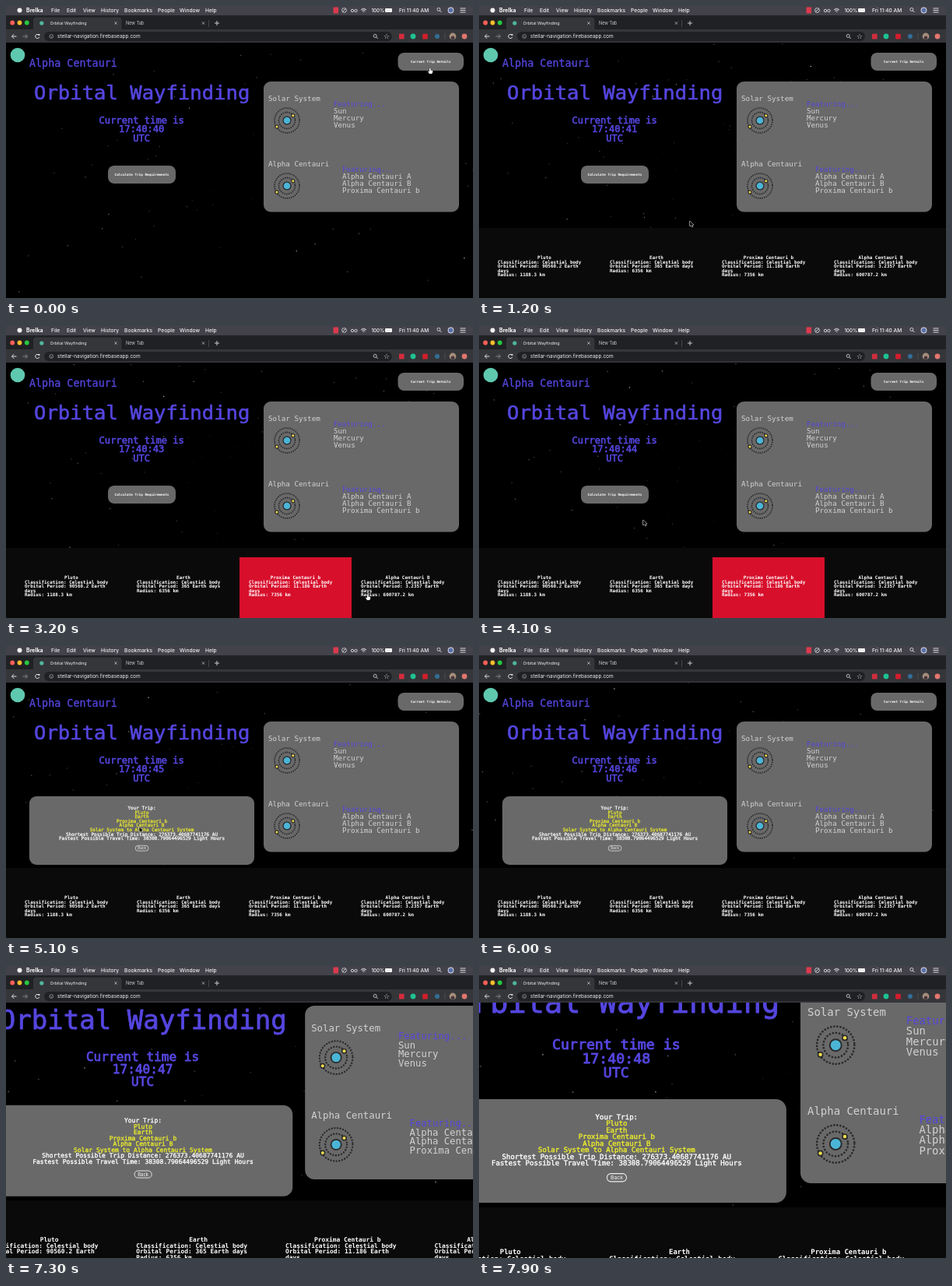
Recreate the animation shown at these times as an HTML page with a canvas. Size 600 by 375 pixels, loop 8 s.

```html
<!DOCTYPE html>
<html lang="en">
<head>
<meta charset="utf-8">
<title>Orbital Wayfinding</title>
<style>
html, body { margin: 0; width: 100%; height: 100%; overflow: hidden; background: #000; }
canvas { display: block; width: 600px; height: 375px; }
</style>
</head>
<body>
<canvas id="stage" width="600" height="375"></canvas>
<script>
const c = document.getElementById('stage').getContext('2d');
const LOOP = 8000, TAU = Math.PI * 2;
const MONO = '"DejaVu Sans Mono", monospace', SANS = 'Inter, sans-serif';
const VIOLET = '#5546df', GREY = '#696969', PALE = '#d2d2d2', YELLOW = '#eeee2c';
const BAR_AT = 700, PICK_AT = 2300, TRIP_AT = 4500, HIDE_AT = 5400, ZOOM_AT = 6600;

function text(s, x, y, size, color, { align = 'left', weight = 400, font = MONO, thick = 0 } = {}) {
  c.font = `${weight} ${size}px ${font}`;
  c.textAlign = align;
  c.fillStyle = c.strokeStyle = color;
  c.fillText(s, x, y);
  if (thick) {
    c.lineWidth = thick;
    c.lineJoin = 'round';
    c.strokeText(s, x, y);
  }
}

function box(x, y, w, h, r, color) {
  c.fillStyle = color;
  c.beginPath();
  c.roundRect(x, y, w, h, r);
  c.fill();
}

function disc(x, y, r, color) {
  c.fillStyle = color;
  c.beginPath();
  c.arc(x, y, r, 0, TAU);
  c.fill();
}

function ring(x, y, r, color, width = 0.8, from = 0, to = TAU) {
  c.strokeStyle = color;
  c.lineWidth = width;
  c.beginPath();
  c.arc(x, y, r, from, to);
  c.stroke();
}

function lines(color, width, ...paths) {
  c.strokeStyle = color;
  c.lineWidth = width;
  c.beginPath();
  for (const p of paths)
    for (let i = 0; i < p.length; i += 2) c[i ? 'lineTo' : 'moveTo'](p[i], p[i + 1]);
  c.stroke();
}

let seed = 11;
const random = () => (seed = seed * 16807 % 2147483647) / 2147483647;
const stars = Array.from({ length: 130 }, () => ({
  angle: random() * TAU, phase: random(), speed: 0.5 + random(), light: 0.25 + 0.7 * random() ** 3
}));

// Stars drift outward from the middle of the page.
function drawStars(t) {
  for (const s of stars) {
    const p = (s.phase + s.speed * t / 16000) % 1, r = 20 + 350 * p;
    c.globalAlpha = s.light * Math.min(1, p * 3);
    disc(300 + r * Math.cos(s.angle), 211 + r * 0.8 * Math.sin(s.angle), 0.5 + 0.4 * p, '#d8d8e0');
  }
  c.globalAlpha = 1;
}

function drawOrbits(x, y) {
  c.lineCap = 'round';
  for (const r of [10.5, 16]) {
    c.setLineDash([0.01, TAU * r / Math.round(r * 2.3)]);
    ring(x, y, r, '#292929', 1.8);
  }
  c.setLineDash([]);
  c.lineCap = 'butt';
  disc(x, y, 5.6, '#292929');
  disc(x, y, 4.3, '#4bb5d6');
  for (const [dx, dy] of [[-13, 8], [7.8, -6.2]]) {
    disc(x + dx, y + dy, 2.6, '#292929');
    disc(x + dx, y + dy, 1.5, '#f0dc4e');
  }
}

function drawSystem(name, y, x, bodies) {
  text(name, 337, y, 9.25, PALE);
  drawOrbits(361, y + 25);
  text('Featuring...', x, y + 7.2, 9.2, VIOLET);
  bodies.forEach((b, i) => text(b, x, y + 16.1 + i * 8.8, 9.2, PALE));
}

function drawButton(label, x, y, w) {
  box(x, y, w, 23, 8, GREY);
  text(label, x + w / 2, y + 13, 4.3, '#fff', { align: 'center', weight: 700 });
}

function drawTrip() {
  box(30, 193, 289, 88, 9, GREY);
  const rows = ['Your Trip:', 'Pluto', 'Earth', 'Proxima Centauri b', 'Alpha Centauri B',
    'Solar System to Alpha Centauri System',
    'Shortest Possible Trip Distance: 276373.40687741176 AU',
    'Fastest Possible Travel Time: 38308.79064496529 Light Hours'];
  rows.forEach((s, i) => text(s, 174.5, 210 + i * 5.62, 6,
    i > 0 && i < 6 ? YELLOW : '#fff', { align: 'center', thick: 0.25 }));
  c.strokeStyle = '#eee';
  c.lineWidth = 0.7;
  c.beginPath();
  c.roundRect(166.3, 256.3, 16.6, 6.8, 3.2);
  c.stroke();
  text('Back', 174.6, 261.4, 4.5, '#fff', { align: 'center', font: SANS });
}

const bodies = [
  ['Pluto', '90560.2', '1188.3'], ['Earth', '365', '6356'],
  ['Proxima Centauri b', '11.186', '7356'], ['Alpha Centauri B', '3.2357', '600787.2']
];

function drawBar(t) {
  c.fillStyle = '#0a0a0a';
  c.fillRect(0, 285, 600, 90);
  if (t >= PICK_AT && t < TRIP_AT) {
    c.fillStyle = '#d70f2b';
    c.fillRect(300, 297, 144, 78);
  }
  bodies.forEach(([name, period, radius], i) => {
    const x = 24 + i * 144, orbit = `Orbital Period: ${period} Earth`;
    const rows = ['Classification: Celestial body',
      ...(period.length < 4 ? [orbit + ' days'] : [orbit, 'days']), `Radius: ${radius} km`];
    text(name, x + 60, 325, 5.95, '#fff', { align: 'center', weight: 700 });
    rows.forEach((s, k) => text(s, x, 330.6 + k * 5.6, 5.95, '#fff', { weight: 700 }));
  });
}

function drawPage(t) {
  c.save();
  c.beginPath();
  c.rect(0, 47, 600, 328);
  c.clip();
  const zoom = 1 + 0.85 * (1 - Math.exp(-Math.max(0, t - ZOOM_AT) / 1424));
  c.translate(170, 236);
  c.scale(zoom, zoom);
  c.translate(-170, -236);
  drawStars(t);
  disc(15, 63, 9.3, '#5fc9b0');
  text('Alpha Centauri', 30, 78, 13.4, VIOLET, { thick: 0.3 });
  text('Orbital Wayfinding', 36, 119.5, 25.6, VIOLET, { thick: 0.6 });
  const second = 40 + Math.floor((t + 400) / 1000);
  ['Current time is', '17:40:' + second, 'UTC'].forEach((s, i) =>
    text(s, 174.2, 150.5 + i * 11.8, 12.1, VIOLET, { align: 'center', thick: 0.6 }));
  drawButton('Current Trip Details', 503.5, 60, 84.5);
  box(331, 97, 251, 167.5, 9, GREY);
  drawSystem('Solar System', 122, 421, ['Sun', 'Mercury', 'Venus']);
  drawSystem('Alpha Centauri', 206, 432, ['Alpha Centauri A', 'Alpha Centauri B', 'Proxima Centauri b']);
  if (t < TRIP_AT) drawButton('Calculate Trip Requirements', 131, 205, 87);
  else drawTrip();
  if (t >= BAR_AT) drawBar(t);
  c.restore();
}

function cross(x, y) {
  lines('#bbb', 0.8, [x - 1.7, y - 1.7, x + 1.7, y + 1.7], [x + 1.7, y - 1.7, x - 1.7, y + 1.7]);
}

function lens(x, y, color) {
  ring(x - 0.6, y - 0.6, 2, color);
  lines(color, 0.9, [x + 0.9, y + 0.9, x + 3, y + 3]);
}

function drawMenu() {
  c.fillStyle = '#434149';
  c.fillRect(0, 0, 600, 12);
  const opt = { font: SANS, weight: 500 };
  disc(17.5, 5.5, 3, '#f2f2f2');
  text('Brelka', 26, 8, 7, '#fff', { font: SANS, weight: 700 });
  Object.entries({ File: 58, Edit: 78, View: 99, History: 122, Bookmarks: 152, People: 195, Window: 223, Help: 256 })
    .forEach(([s, x]) => text(s, x, 8, 6.7, '#f2f2f2', opt));
  box(420.5, 1.5, 6.5, 8, 0.5, '#d93a4e');
  ring(434.5, 5.5, 2.9, '#eee');
  lines('#eee', 0.8, [432.8, 7.3, 436.2, 3.7]);
  ring(445, 6, 1.7, '#eee');
  ring(449.5, 6, 1.7, '#eee');
  for (const r of [1, 3, 5]) ring(459.5, 8.5, r, '#eee', 1, -2.3, -0.84);
  text('100%', 469.5, 8, 6.2, '#f2f2f2', opt);
  box(487, 3, 9, 5, 1, '#eee');
  text('Fri 11:40 AM', 505, 8, 6.6, '#f2f2f2', opt);
  lens(556.5, 5, '#eee');
  disc(571.5, 5.5, 3.9, '#d5d5df');
  disc(571.5, 5.5, 2.9, '#5a6faa');
  lines('#eee', 0.9, [583.5, 3, 590.5, 3], [583.5, 5.5, 590.5, 5.5], [583.5, 8, 590.5, 8]);
}

function drawBrowser() {
  c.fillStyle = '#202124';
  c.fillRect(0, 12, 600, 19);
  ['#ff5f57', '#febc2e', '#28c840'].forEach((color, i) => disc(8.2 + i * 9.3, 21.5, 2.9, color));
  box(35, 14.5, 113.5, 20, 4, '#35363a');
  c.fillStyle = '#35363a';
  c.fillRect(0, 30, 600, 17);
  disc(45.8, 22, 2.6, '#4fb89f');
  text('Orbital Wayfinding', 56.5, 24.3, 5.4, '#eee', { font: SANS });
  text('New Tab', 154, 24.3, 5.6, '#c8cacd', { font: SANS });
  cross(141, 22);
  cross(253.5, 22);
  lines('#55575b', 0.7, [260.5, 18, 260.5, 27]);
  lines('#ddd', 0.9, [268, 22, 274, 22], [271, 19, 271, 25]);

  lines('#ddd', 1, [13.5, 39, 7.5, 39], [10.2, 36.2, 7.5, 39, 10.2, 41.8]);
  lines('#85878a', 1, [21.5, 39, 27.5, 39], [24.8, 36.2, 27.5, 39, 24.8, 41.8]);
  ring(40.3, 39, 2.6, '#ddd', 1, 0.3, 5.4);
  box(41.4, 36, 2, 2, 0, '#ddd');
  box(49, 33, 447, 12.2, 6.1, '#202124');
  ring(58.3, 39, 2.4, '#aaa', 0.7);
  lines('#aaa', 0.7, [58.3, 38.6, 58.3, 40.5]);
  text('stellar-navigation.firebaseapp.com', 66, 41.3, 6.5, '#eee', { font: SANS });
  lens(474.8, 39, '#ddd');
  text('☆', 489, 42, 9, '#ddd', { align: 'center', font: '"DejaVu Sans", sans-serif' });
  box(505, 35.8, 6.6, 6.6, 0.5, '#d32d3d');
  disc(523, 39, 3.4, '#1fc092');
  box(535.2, 35.8, 6.6, 6.6, 1, '#d31e2b');
  disc(554, 39, 2.9, '#326f98');
  lines('#55575b', 0.7, [564, 35, 564, 43]);
  disc(574, 39, 4.4, '#a88d7b');
  disc(574, 41, 2.4, '#453a3c');
  disc(589, 39, 3.4, '#e0766f');
}

// Time, x, y of the pointer.
const path = [[0, 545, 80], [500, 545, 80], [1200, 271, 276], [2200, 370, 336], [2500, 370, 336],
  [3100, 465, 345], [3400, 465, 345], [4100, 211, 249], [4400, 176, 218], [HIDE_AT, 170, 236]];

function drawPointer(t) {
  if (t >= HIDE_AT) return;
  const i = path.findIndex(p => p[0] > t), [t0, x0, y0] = path[i - 1], [t1, x1, y1] = path[i];
  const k = (t - t0) / (t1 - t0), e = k * k * (3 - 2 * k);
  const x = x0 + (x1 - x0) * e, y = y0 + (y1 - y0) * e;
  const onButton = y < 83 && x > 503 || t < TRIP_AT && y > 205 && y < 228 && x > 131 && x < 218;
  const hand = onButton || t >= BAR_AT && y > 297;
  const shape = hand
    ? [-1, 0, 0.5, 0, 0.5, 2.4, 3.2, 3, 3, 5.5, 2, 7, -1, 7, -3, 4, -2.4, 3.4, -1, 4.6]
    : [0, 0, 0, 6.8, 1.6, 5.4, 2.7, 7.8, 3.8, 7.3, 2.7, 5, 4.8, 4.8];
  c.save();
  c.translate(x, y);
  c.lineJoin = 'round';
  lines(hand ? '#222' : '#fff', 1, [...shape, shape[0], shape[1]]);
  c.fillStyle = hand ? '#fff' : '#111';
  c.fill();
  c.restore();
}

function draw(now) {
  const t = now % LOOP;
  c.fillStyle = '#000';
  c.fillRect(0, 0, 600, 375);
  drawPage(t);
  drawMenu();
  drawBrowser();
  drawPointer(t);
  requestAnimationFrame(draw);
}
requestAnimationFrame(draw);
</script>
</body>
</html>
```
